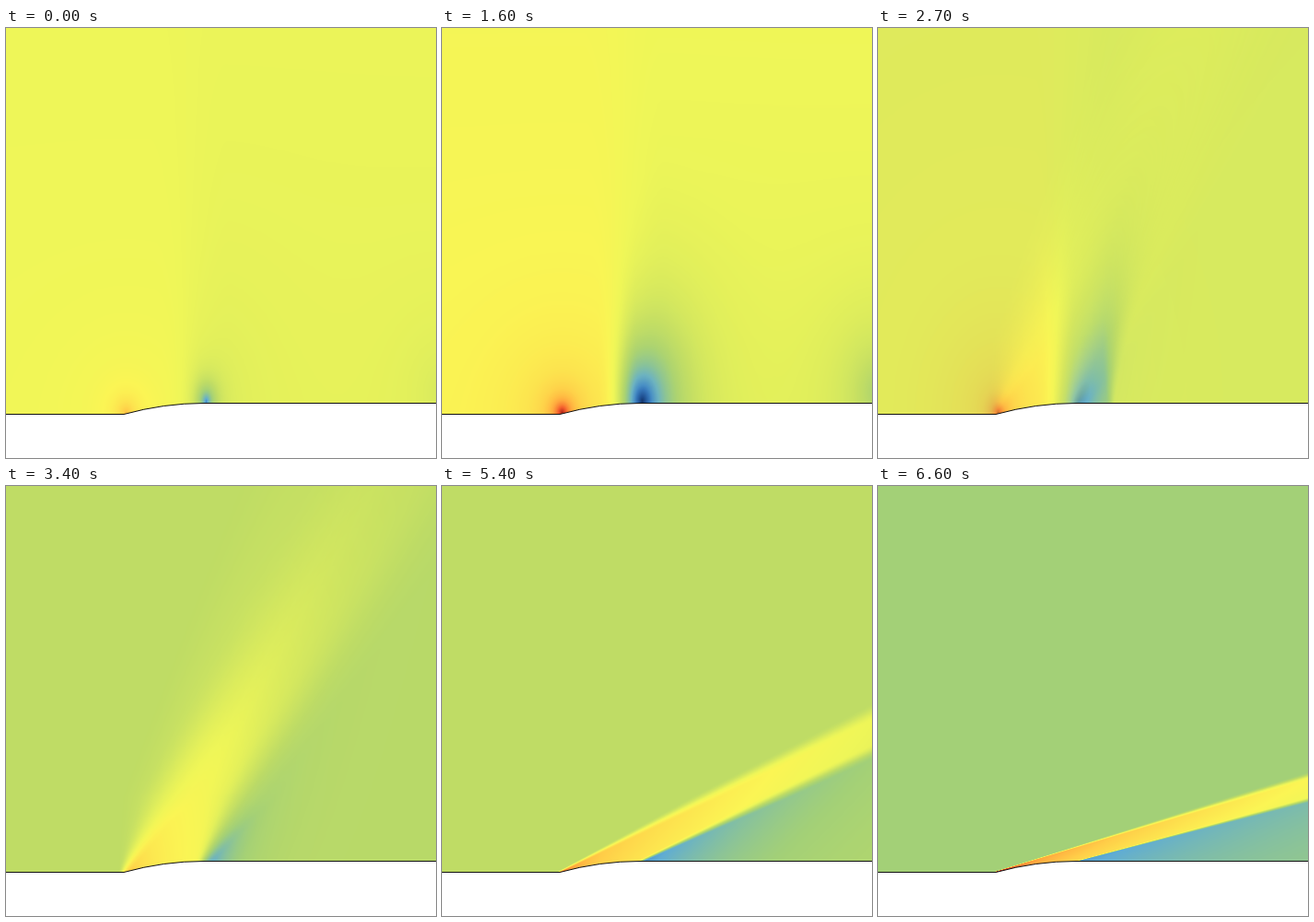
Write an HTML page with a canvas that moves like this. It is 467 px wide and 467 px high and loops after 6800 ms.

```html
<!DOCTYPE html>
<html>
<head>
<meta charset="utf-8">
<style>
  html, body { margin: 0; width: 100%; height: 100%; overflow: hidden; background: #fff; }
  canvas { display: block; }
</style>
</head>
<body>
<canvas id="stage" width="467" height="467"></canvas>
<script>
const SIZE = 467, FIELD_H = 420, TICK = 100, TICKS = 68;
const LEAD = 128, TRAIL = 215, LOW = 419.5, HIGH = 407.5;
const { hypot, exp, min, max, floor } = Math;
const clamp = (v, lo, hi) => min(hi, max(lo, v));
const lerp = (a, b, t) => a + (b - a) * t;
const smooth = (a, b, v) => {
  const t = clamp((v - a) / (b - a), 0, 1);
  return t * t * (3 - 2 * t);
};

// Pressure colours: [value, hex], zero is plain yellow.
const stops = [
  [-1, '102c5c'], [-.8, '2864af'], [-.6, '5facd4'], [-.35, 'a3d077'],
  [-.22, 'bfdc65'], [-.03, 'eef658'], [.05, 'fbf554'], [.3, 'ffcd48'],
  [.5, 'ffa03c'], [.75, 'f04628'], [1, '8c190f']
].map(([v, hex]) => [v, [0, 2, 4].map(i => parseInt(hex.substr(i, 2), 16))]);

const palette = Array.from({ length: 1001 }, (_, n) => {
  const v = n / 500 - 1;
  const i = clamp(stops.findIndex(s => s[0] >= v), 1, stops.length - 1);
  const [a, ca] = stops[i - 1], [b, cb] = stops[i];
  return ca.map((c, k) => lerp(c, cb[k], (v - a) / (b - a)));
});

// Subsonic flow: high pressure at the ramp foot, suction at its shoulder.
function subsonic(k) {
  const mix = (a, b) => lerp(a, b, k);
  const tip = mix(.3, .72), glow = mix(.08, .24), suction = mix(.6, .95);
  const reach = mix(14, 54), tilt = mix(.03, .09), outlet = mix(.07, .3);
  return (x, y) => {
    const foot = hypot((x - LEAD - 2) * 1.3, y - 417);
    const crest = hypot((x - 217) * 1.8, y - 405);
    const exit = hypot((x - 472) * 1.7, y - 395);
    const right = smooth(165, 250, x + (420 - y) * .03);
    return mix(-.03, .02) + tip * exp(-foot / 13) + glow * exp(-foot / 60)
      - smooth(168, 212, x) * (suction * exp(-crest / reach) + .07 * exp(-crest / 80))
      - outlet * exp(-exit / 50) + tilt * (.4 * (1 - right) * y / FIELD_H - right * (.4 + .5 * y / FIELD_H));
  };
}

// Near Mach 1: the suction zone leans back and ends in a sharp front.
function transonic(x, y) {
  const h = max(0, 407 - y);
  const foot = hypot((x - LEAD - 2) * 1.5, y - 417);
  const plume = hypot((x - 217 - h * .32) * 2.6, h);
  const front = 253 + h * h / 1000, soft = 5 + h * .16;
  const ahead = 1 - smooth(front - soft, front + soft, x);
  return .02 - .06 * smooth(170, 260, x) + .6 * exp(-foot / 12) + .3 * exp(-foot / 85)
    - .78 * smooth(172, 215, x) * ahead * exp(-plume / 115);
}

// Supersonic flow: compression band between two waves, expansion fan behind it.
function supersonic([front, rear, edge, base, power, reach, suction, fanReach, fanWidth, wake]) {
  return (x, y) => {
    const start = LEAD + (418 - y) / front, end = TRAIL + (407 - y) / rear;
    const t = (x - start) / (end - start);
    const e = edge * min(1, .2 + (418 - y) / 100);
    const tip = hypot(x - LEAD, y - 418), corner = hypot(x - TRAIL, y - 407);
    const fan = smooth(1 - e, 1 + e, t);
    const band = smooth(-e, e, t) * (1 - fan);
    const rise = (power * exp(-tip / reach) + power * .5 * exp(-tip / 18)) * (1 - .2 * clamp(t, 0, 1));
    const drop = suction * exp(-corner / fanReach - max(0, x - end) / fanWidth) + wake;
    return base + band * rise - fan * drop;
  };
}

const flows = [
  ...[0, .33, .67, 1].map(subsonic),
  transonic,
  ...[
    [2.6, 2.1, .45, -.22, .38, 290, .45, 75, 35, .02],
    [1.75, 1.52, .4, -.22, .4, 290, .45, 90, 40, .03],
    [1.05, .95, .34, -.22, .45, 290, .44, 105, 50, .04],
    [.66, .62, .28, -.22, .53, 300, .42, 125, 80, .05],
    [.51, .47, .22, -.22, .6, 340, .4, 180, 180, .05],
    [.41, .37, .18, -.22, .68, 390, .38, 250, 300, .04],
    [.306, .264, .15, -.35, .9, 450, .27, 350, 250, .02]
  ].map(supersonic)
];

function tracePlate(c) {
  c.beginPath();
  c.moveTo(-2, LOW);
  c.lineTo(LEAD, LOW);
  c.quadraticCurveTo((LEAD + TRAIL) / 2, HIGH, TRAIL, HIGH);
  c.lineTo(SIZE + 2, HIGH);
}

function render(flow) {
  const canvas = document.createElement('canvas');
  canvas.width = canvas.height = SIZE;
  const c = canvas.getContext('2d');
  const image = c.createImageData(SIZE, FIELD_H);
  for (let y = 0, i = 0; y < FIELD_H; y++) {
    for (let x = 0; x < SIZE; x++, i += 4) {
      const [r, g, b] = palette[floor((clamp(flow(x, y), -1, 1) + 1) * 500)];
      image.data[i] = r;
      image.data[i + 1] = g;
      image.data[i + 2] = b;
      image.data[i + 3] = 255;
    }
  }
  c.putImageData(image, 0, 0);
  tracePlate(c);
  c.lineTo(SIZE + 2, SIZE);
  c.lineTo(-2, SIZE);
  c.fillStyle = '#fff';
  c.fill();
  tracePlate(c);
  c.strokeStyle = '#111';
  c.stroke();
  return canvas;
}

const pictures = flows.map(render);
const ctx = document.getElementById('stage').getContext('2d');

// Each picture holds for two ticks, then fades to the next in five steps.
function draw() {
  const tick = floor(performance.now() / TICK) % TICKS;
  const index = floor(tick / 6), fade = max(0, tick % 6 - 1) / 5;
  ctx.globalAlpha = 1;
  ctx.drawImage(pictures[index], 0, 0);
  if (fade) {
    ctx.globalAlpha = fade;
    ctx.drawImage(pictures[index + 1], 0, 0);
  }
  requestAnimationFrame(draw);
}
draw();
</script>
</body>
</html>
```
